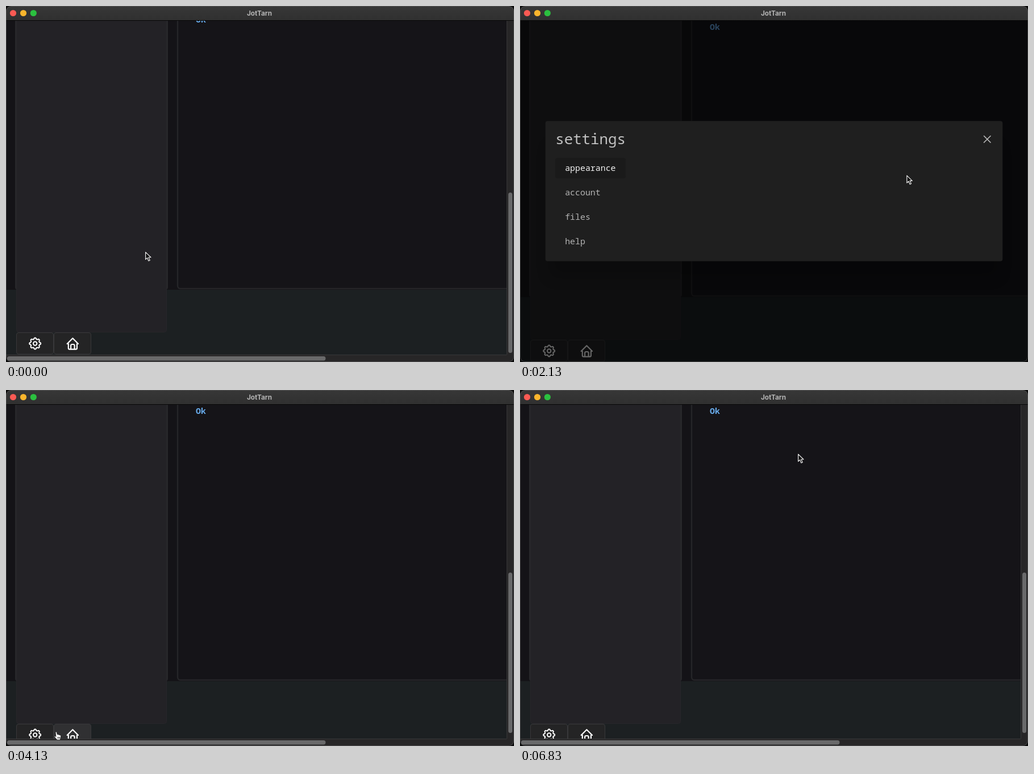
Animation of 894 by 626 pixels, one loop 7670 ms. Source, as an HTML page:

```html
<!DOCTYPE html>
<html lang="en">
<head>
<meta charset="utf-8">
<title>JotTarn</title>
<style>
  html, body { margin: 0; width: 100%; height: 100%; overflow: hidden; background: #0b0b0b; }
  svg { display: block; width: 100vw; height: 100vh; }
  text { white-space: pre; }
  .mono { font-family: "Fira Code", "Noto Sans Mono", "DejaVu Sans Mono", monospace; font-size: 14.9px; }
  .title { font: 700 11.8px Inter, "Liberation Sans", sans-serif; }
  .icon { fill: none; stroke: #fff; stroke-width: 2; stroke-linecap: round; stroke-linejoin: round; }
  .button { fill: #242425; stroke: #38383a; }
</style>
</head>
<body>
<svg viewBox="0 0 894 626">
  <defs>
    <linearGradient id="barFill" x2="0" y2="1">
      <stop stop-color="#373737"/><stop offset="1" stop-color="#303030"/>
    </linearGradient>
    <clipPath id="windowClip"><rect width="894" height="626" rx="9"/></clipPath>
    <clipPath id="viewClip"><rect y="26" width="894" height="600"/></clipPath>
    <filter id="blur" x="-10%" y="-30%" width="120%" height="160%"><feGaussianBlur stdDeviation="12"/></filter>
  </defs>

  <g clip-path="url(#windowClip)">
    <g clip-path="url(#viewClip)">
      <rect width="894" height="626" fill="#1c2022"/>
      <g id="page">
        <rect y="-20" width="894" height="519" fill="#141317"/>
        <rect x="16" y="-20" width="269" height="518.5" rx="4" fill="#27272a"/>
        <rect x="18.5" y="-20" width="264" height="593.5" rx="4" fill="#232226" stroke="#27262a"/>
        <rect x="302" y="-20" width="620" height="517" rx="5" fill="#151418" stroke="#252528" stroke-width="2.4"/>
        <text class="mono" x="334" y="29" font-weight="700" fill="#67a9e8">Ok</text>
        <rect id="gearButton" class="button" x="18.5" y="574.5" width="65" height="37.5" rx="3.5"/>
        <rect id="homeButton" class="button" x="84.5" y="574.5" width="65" height="37.5" rx="3.5"/>
        <g class="icon">
          <g transform="translate(51.2 593.5)"><path id="gear"/><circle r="3.2"/></g>
          <path transform="translate(104.4 581) scale(1.08)"
            d="M5 12H3L12 3L21 12H19M5 12V19A2 2 0 0 0 7 21H17A2 2 0 0 0 19 19V12M9 21V15A2 2 0 0 1 11 13H13A2 2 0 0 1 15 15V21"/>
        </g>
      </g>

      <g id="scrollbars">
        <rect x="881" y="26" width="13" height="600" fill="#272627"/>
        <rect y="613" width="894" height="13" fill="#272627"/>
        <path d="M881.5 26V613M0 613.5H881" stroke="#383839"/>
        <rect id="thumb" x="884" width="7" height="282" rx="3.5" fill="#69696a"/>
        <rect x="2" y="616" width="560.5" height="7.5" rx="3.7" fill="#69696a"/>
      </g>

      <rect id="overlay" y="26" width="894" height="600" opacity="0"/>
      <g id="modal">
        <rect x="52" y="245" width="790" height="232" rx="4" opacity=".18" filter="url(#blur)"/>
        <rect x="44.7" y="202.3" width="804.6" height="246.4" rx="4" fill="#1f1f1f"/>
        <text class="mono" x="62.2" y="243" font-size="26" style="font-size:25.8px" fill="#c1c1c1">settings</text>
        <rect x="62" y="267" width="124" height="36" rx="4" fill="#1a1a1a"/>
        <g id="menu"></g>
        <g id="close">
          <rect id="closeHover" x="807" y="219" width="31" height="31" rx="4" fill="#29292a"/>
          <path d="M816.5 228.5L828 240M828 228.5L816.5 240" stroke="#bdbdbd" stroke-width="1.6" stroke-linecap="round"/>
        </g>
      </g>
    </g>

    <rect width="894" height="25" fill="url(#barFill)"/>
    <path d="M0 25.5H894" stroke="#060606"/>
    <circle cx="12.5" cy="12.5" r="5.6" fill="#fa5a53"/>
    <circle cx="30.5" cy="12.5" r="5.6" fill="#fab52d"/>
    <circle cx="48.3" cy="12.5" r="5.6" fill="#2bc03f"/>
    <text class="title" x="446" y="16.6" text-anchor="middle" fill="#b4b4b4">JotTarn</text>
    <rect x=".5" y=".5" width="893" height="625" rx="8.5" fill="none" stroke="#696969" stroke-opacity=".55"/>

    <g id="cursor">
      <path id="arrow" d="M.6 .8V13.7L3.6 10.9L5.9 16.2L8.2 15.2L5.9 10H10Z" fill="#141414" stroke="#f2f2f2" stroke-width="1.15" stroke-linejoin="round"/>
      <path id="hand" d="M0 .8C.9 -.4 2.2 .1 2.5 1.2L3.5 5C4.5 4.2 5.4 4.5 5.8 5.4C6.7 4.9 7.5 5.2 7.8 6C9.1 5.7 9.8 6.5 9.7 7.7L9 11.5L8.1 14.2H2.8L-1.8 8.7C-2 7.5 -.6 7.2 .9 8.6Z M4 9V12M5.8 9V12M7.4 9V12"
        fill="#fafafa" stroke="#171717" stroke-width=".8" stroke-linejoin="round"/>
    </g>
  </g>
</svg>

<script>
  const LOOP = 7670, FADE = 200;
  const SETTLED = 13;
  const sessions = [[930, 3080], [4745, 5955]];
  // Cursor moves: start, end, target x, target y
  const moves = [
    [30, 790, 63, 588],
    [1410, 2400, 817, 233],
    [3300, 4130, 87, 601],
    [4130, 4290, 75, 597],
    [5060, 5720, 489, 112]
  ];
  const byId = id => document.getElementById(id);
  const el = Object.fromEntries(
    ['page', 'gearButton', 'homeButton', 'scrollbars', 'thumb', 'overlay', 'modal',
     'close', 'closeHover', 'cursor', 'arrow', 'hand'].map(id => [id, byId(id)]));
  const clamp = v => Math.min(1, Math.max(0, v));
  const smooth = u => u * u * (3 - 2 * u);
  const show = (node, on) => node.setAttribute('visibility', on ? 'inherit' : 'hidden');
  const shift = (node, x, y) => node.setAttribute('transform', `translate(${x} ${y})`);
  const inside = ([px, py], x, y, w, h) => px >= x && px < x + w && py >= y && py < y + h;

  // The CSS "ease" curve, solved by bisection
  function ease(x) {
    if (x <= 0 || x >= 1) return clamp(x);
    const bezier = (s, a, b) => 3 * s * (1 - s) ** 2 * a + 3 * s * s * (1 - s) * b + s ** 3;
    let low = 0, high = 1;
    for (let i = 0; i < 20; i++) {
      const mid = (low + high) / 2;
      if (bezier(mid, .25, .25) < x) low = mid; else high = mid;
    }
    return bezier(low, .1, 1);
  }

  function gearPath() {
    const points = [];
    for (let i = 0; i < 160; i++) {
      const a = i / 160 * 2 * Math.PI;
      const r = 8.9 + 1.15 * Math.tanh(1.5 * Math.cos(8 * a));
      points.push(`${(r * Math.sin(a)).toFixed(2)} ${(-r * Math.cos(a)).toFixed(2)}`);
    }
    return `M${points.join('L')}Z`;
  }

  function cursorAt(t) {
    let x = 245, y = 432;
    for (const [start, end, tx, ty] of moves) {
      const k = smooth(clamp((t - start) / (end - start)));
      x += (tx - x) * k;
      y += (ty - y) * k;
    }
    return [x, y];
  }

  function render(t) {
    const session = sessions.find(([open, shut]) => t >= open && t < shut + FADE);
    const opacity = !session ? 0 : t < session[1]
      ? ease((t - session[0]) / FADE)
      : 1 - ease((t - session[1]) / FADE);
    const offset = t < sessions[0][0] ? 0 : SETTLED;
    const point = cursorAt(t);

    shift(el.page, 0, offset);
    show(el.scrollbars, !session);
    el.thumb.setAttribute('y', offset ? 321 : 328);
    el.overlay.setAttribute('opacity', .6 * opacity);
    show(el.modal, session);
    el.modal.setAttribute('opacity', opacity);
    shift(el.modal, 0, -30 * (1 - opacity));

    const onGear = !session && inside(point, 18, 574 + offset, 66, 38);
    const onHome = !session && inside(point, 84, 574 + offset, 66, 38);
    const onClose = session && inside(point, 806, 219, 32, 32);
    el.gearButton.style.fill = onGear ? '#303032' : '';
    el.homeButton.style.fill = onHome ? '#303032' : '';
    show(el.closeHover, onClose);
    shift(el.close, 0, t >= 2830 && t < 3080 ? 1 : 0);

    const pointing = onGear || onHome || onClose;
    show(el.hand, pointing);
    show(el.arrow, !pointing);
    shift(el.cursor, ...point);
  }

  byId('gear').setAttribute('d', gearPath());
  byId('menu').innerHTML = ['appearance', 'account', 'files', 'help'].map((label, i) =>
    `<text class="mono" x="79.2" y="${290 + 42.9 * i}" fill="${i ? '#b4b4b4' : '#f0f0f0'}">${label}</text>`).join('');

  const began = performance.now();
  function tick() {
    render((performance.now() - began) % LOOP);
    requestAnimationFrame(tick);
  }
  tick();
</script>
</body>
</html>
```
